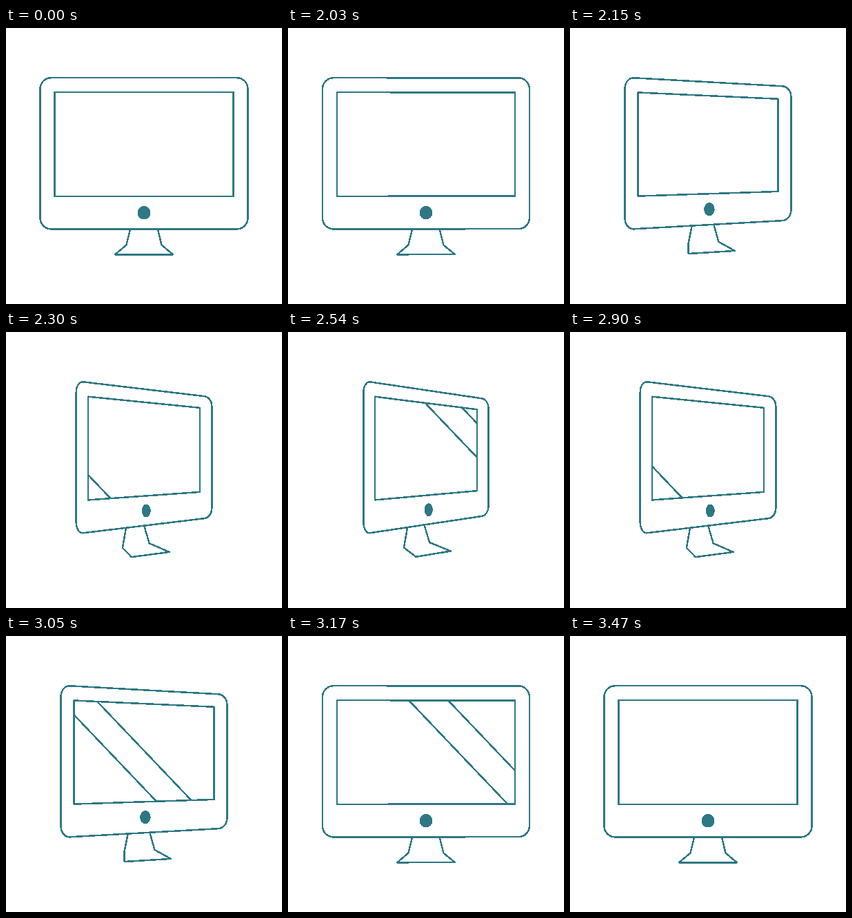
An HTML page for the animation above (3.65 s loop, 400x400 px).

```html
<!DOCTYPE html>
<html lang="en">
<head>
<meta charset="utf-8">
<title>Monitor</title>
<style>
  html, body { margin: 0; width: 100%; height: 100%; overflow: hidden; background: #fff; }
  svg { display: block; width: 100%; height: 100%; shape-rendering: crispEdges; }
  path { fill: none; stroke: #2d7884; stroke-width: 2.5; stroke-linejoin: round; stroke-linecap: round; }
  ellipse { fill: #2d7884; }
</style>
</head>
<body>
<svg viewBox="0 0 400 400">
  <clipPath id="glass"><path id="pane"/></clipPath>
  <path id="glare" clip-path="url(#glass)"/>
  <path id="stand"/>
  <path id="body"/>
  <path id="screen"/>
  <ellipse id="button"/>
</svg>
<script>
const LOOP = 3650, STEP = 30, START = 2000, TURN = 600;
const MID = 200, HORIZON = 181;

const BODY = { half: 150.5, top: 72.2, bottom: 291.42, squeeze: 0.4, radius: 16 };
const SCREEN = { half: 129.5, top: 93.2, bottom: 243.8, squeeze: 0.432, radius: 0 };

// The stand is symmetric from the front
const HALF_STAND = [[20, 292], [25.5, 314.5], [42, 328.3]];
const FRONT = [
  ...HALF_STAND.map(([x, y]) => [MID - x, y]),
  ...HALF_STAND.map(([x, y]) => [MID + x, y]).reverse()
];
const TURNED = [[173, 283.5], [168, 312.5], [185.5, 325.8], [236, 317.5], [205, 305], [197.5, 280]];

const PASSES = [
  { start: 180, length: 510, from: -38, to: 309 },
  { start: 750, length: 720, from: -23.5, to: 386 }
];

const $ = id => document.getElementById(id);
const mix = (a, b, p) => a + (b - a) * p;
const smooth = x => x * x * (3 - 2 * x);

// cubic-bezier(1/3, 0, 0, 1)
function ease(x) {
  if (x <= 0) return 0;
  let lo = 0, hi = 1;
  for (let i = 0; i < 30; i++) {
    const s = (lo + hi) / 2;
    if (s * (1 - s) ** 2 + s ** 3 < x) lo = s; else hi = s;
  }
  return smooth(lo);
}

// Narrows towards the middle and shrinks heights towards the right
function warp(dx, y, squeeze, p) {
  const scale = 1 - p * (0.112 + 0.00082 * dx);
  return [MID + dx * (1 - squeeze * p), HORIZON + (y - HORIZON) * scale];
}

function panel({ half, top, bottom, squeeze, radius }, p) {
  const corners = [[-1, -1], [1, -1], [1, 1], [-1, 1]].map(([sx, sy]) => {
    const y = sy < 0 ? top : bottom;
    const across = r => warp(sx * (half - r), y, squeeze, p);
    const down = r => warp(sx * half, y - sy * r, squeeze, p);
    const [a, b] = sx === sy ? [down, across] : [across, down];
    return `${a(radius)}C${a(radius * 0.45)} ${b(radius * 0.45)} ${b(radius)}`;
  });
  return `M${corners.join("L")}Z`;
}

function stand(p) {
  return "M" + FRONT.map((q, i) => q.map((v, k) => mix(v, TURNED[i][k], p))).join("L");
}

// Two slanted lines sweep over the glass
function glare(t, p) {
  const pass = PASSES.find(s => t >= s.start && t < s.start + s.length);
  if (!pass) return "";
  const x = mix(pass.from, pass.to, smooth((t - pass.start) / pass.length));
  const slash = x0 => `M${x0 - 10} ${SCREEN.top - 10.5}l160 168`;
  return slash(x) + slash(x - mix(57, 47, p));
}

function draw(now) {
  const t = Math.floor((now % LOOP - START) / STEP) * STEP;
  const p = ease(Math.min(t, 2 * TURN - t) / TURN);
  const set = (id, attrs) => {
    for (const name in attrs) $(id).setAttribute(name, attrs[name]);
  };
  const screen = panel(SCREEN, p);
  set("body", { d: panel(BODY, p) });
  set("screen", { d: screen });
  set("pane", { d: screen });
  set("stand", { d: stand(p) });
  set("glare", { d: glare(t, p) });
  const [cx, cy] = warp(0, 267.8, 0, p);
  set("button", { cx: cx + 3.8 * p, cy: cy - 0.4 * p, rx: 9.5 - 3.5 * p, ry: 9.8 - 0.3 * p });
}

function tick() {
  draw(performance.now());
  requestAnimationFrame(tick);
}
tick();
</script>
</body>
</html>
```
